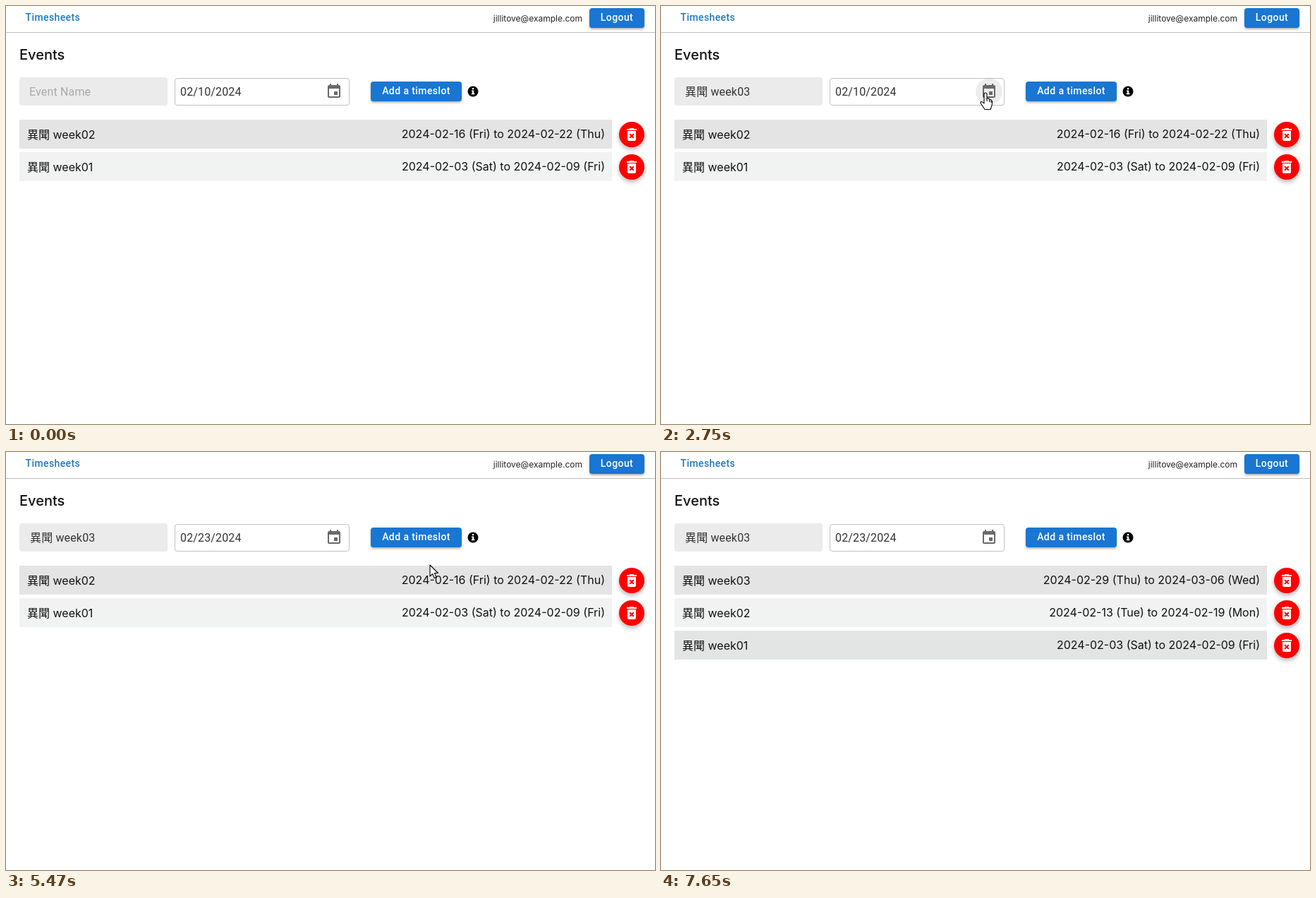
Write an HTML page that moves like this. It is 920x592 px and loops after 9160 ms.

```html
<!DOCTYPE html>
<html lang="en">
<head>
<meta charset="utf-8">
<title>Timesheets</title>
<style>
html, body { margin: 0; width: 100%; height: 100%; overflow: hidden; background: #fff; }
svg { display: block; }
text { font: 16px Inter, "Noto Sans CJK TC", "Noto Sans CJK JP", sans-serif; fill: #111; white-space: pre; }
.cjk { font-weight: 300; }
.rob { font-family: Roboto, "Noto Sans CJK TC", "Noto Sans CJK JP", sans-serif; letter-spacing: .15px; fill: #333; }
.btn { font-size: 14px; font-weight: 500; letter-spacing: .4px; }
.white { fill: #fff; }
.mid { text-anchor: middle; }
.end { text-anchor: end; }
.day { font-size: 12px; letter-spacing: .4px; }
.item { font: 12px "Noto Sans", "Noto Sans CJK TC", "Noto Sans CJK JP", sans-serif; word-spacing: 2px; fill: #222; }
.raised { filter: drop-shadow(0 2px 1.5px rgba(0,0,0,.3)); }
.round { filter: drop-shadow(0 3px 3px rgba(0,0,0,.3)); }
.paper { filter: drop-shadow(0 4px 5px rgba(0,0,0,.32)); }
.menu { filter: drop-shadow(0 1px 2px rgba(0,0,0,.28)); }
</style>
</head>
<body>
<svg width="920" height="592" viewBox="0 0 920 592">
  <g id="page">
    <text class="rob btn" x="27.500" y="21" style="fill:#1f77c2">Timesheets</text>
    <text class="end" x="817" y="22" style="font-size:12px;fill:#222">jillitove@example.com</text>
    <rect class="raised" x="827" y="3" width="78" height="28" rx="4" fill="#1976d2"/>
    <text class="rob btn white mid" x="866" y="21">Logout</text>
    <path d="M0 37.500H920" stroke="#bdbdbd"/>
    <text x="19" y="76" style="font-size:20px;font-weight:500">Events</text>

    <rect x="19" y="101" width="210" height="40" rx="4" fill="#ebebeb"/>
    <text id="name" class="rob" y="127"></text>
    <path id="caret" stroke="#222"/>
    <rect id="box" fill="none"/>
    <text id="date" class="rob" x="247" y="127"></text>
    <circle id="ripple" cx="465" cy="121" r="19" fill="#000" fill-opacity=".07"/>
    <path transform="translate(453 109)" fill="#6b6868" d="M17 12h-5v5h5v-5zM16 1v2H8V1H6v2H5c-1.110 0-1.990.9-1.990 2L3 19c0 1.100.89 2 2 2h14c1.100 0 2-.9 2-2V5c0-1.100-.9-2-2-2h-1V1h-2zm3 18H5V8h14v11z"/>
    <rect id="add" class="raised" x="517" y="107" width="129" height="28" rx="4"/>
    <text class="rob btn white mid" x="581.500" y="125">Add a timeslot</text>
    <circle cx="662" cy="121" r="7.500"/>
    <path d="M661 116h2.200v2.200h-2.200zM660 119.500h3.200v4h1.200v1.700h-4.600v-1.700h1.300v-2.300h-1.100z" fill="#fff"/>
    <g id="rows"></g>
  </g>

  <g id="menu"></g>

  <g id="calendar">
    <rect class="paper" x="239" y="141" width="320" height="334" rx="4" fill="#fff"/>
    <text class="rob" x="263" y="177" style="font-weight:500">February 2024</text>
    <path d="M386 170h10l-5 5z" fill="#666"/>
    <path d="M490 167l-5.500 5 5.500 5M524 167l5.500 5-5.500 5" fill="none" stroke="#666" stroke-width="2"/>
    <circle id="hover" r="18" fill="#f2f7fc"/>
    <circle id="chosen" r="18"/>
    <g id="days"></g>
  </g>

  <g id="loader" fill="#36d7b7"></g>

  <g id="cursor" stroke="#000" stroke-width="1.100" fill="#fff" stroke-linejoin="round">
    <path id="arrow" d="M0 0V16L3.700 12.600L6.200 18.500L9 17.300L6.500 11.500H11.500Z"/>
    <path id="beam" fill="none" d="M-4-8H-1L0-7L1-8H4M0-7V7M-4 8H-1L0 7L1 8H4"/>
    <g id="hand">
      <path d="M-2 2Q-2 0 0 0T2 2V8Q5 7 5.500 9.500Q8 8.500 8 11Q10 10.500 9.500 14L9 18L7 23.500H-1L-6 16Q-8 13-6 12.500Q-4 12.500-2 15Z"/>
      <path d="M2 8V12M5.500 9.500V13M8 11V14" fill="none"/>
    </g>
  </g>
</svg>
<script>
const LOOP = 9160;
const $ = id => document.getElementById(id);
const set = (id, attrs) => { for (const k in attrs) $(id).setAttribute(k, attrs[k]); };
const show = (id, on) => { $(id).style.display = on ? '' : 'none'; };
const clamp = v => Math.max(0, Math.min(1, v));
const smooth = v => v * v * (3 - 2 * v);
const within = (t, a, b) => t >= a && t < b;
// Latest value whose start time has passed
const latest = (t, list) => list.filter(s => s[0] <= t).pop()[1];
const put = (id, html) => {
  const el = $(id);
  if (el.markup !== html) el.innerHTML = el.markup = html;
};
const label = week => `<tspan class="cjk">異聞</tspan> week${week}`;

const TRASH = 'M6 19c0 1.100.9 2 2 2h8c1.100 0 2-.9 2-2V7H6v12zm2.460-7.120l1.410-1.410L12 12.590l2.120-2.120 1.410 1.410L13.410 14l2.120 2.120-1.410 1.410L12 15.410l-2.120 2.120-1.410-1.410L10.590 14l-2.130-2.120zM15.500 4l-1-1h-5l-1 1H5v2h14V4z';
const ROW_FILL = ['#e4e4e4', '#f1f2f2', '#e3e5e4'];
const FIRST = ['01', '2024-02-03 (Sat) to 2024-02-09 (Fri)'];
const BEFORE = [['02', '2024-02-16 (Fri) to 2024-02-22 (Thu)'], FIRST];
const AFTER = [
  ['03', '2024-02-29 (Thu) to 2024-03-06 (Wed)'],
  ['02', '2024-02-13 (Tue) to 2024-02-19 (Mon)'], FIRST];

const rowMarkup = ([week, range], i) => `<g transform="translate(0 ${161 + 46 * i})">
  <rect x="19" width="840" height="41" fill="${ROW_FILL[i]}"/>
  <text x="30" y="27">${label(week)}</text>
  <text class="end" x="849" y="26">${range}</text>
  <circle class="round" cx="887" cy="21" r="18" fill="#f00"/>
  <path transform="translate(875 9)" fill="#fff" d="${TRASH}"/></g>`;

function menuMarkup(weeks, lit) {
  if (!weeks.length) return '';
  return `<rect class="menu" x="103" y="150" width="156" height="${36 * weeks.length + 8}" rx="7" fill="#fff"/>` +
    (lit ? '<rect x="103" y="154" width="156" height="36" fill="#eee"/>' : '') +
    weeks.map((w, i) => `<text class="item" x="115.500" y="${177 + 36 * i}">${label(w)}</text>`).join('');
}

// 1 February 2024 is a Thursday
const dayPos = d => [279 + 40 * ((d + 3) % 7), 254 + 38 * Math.floor((d + 3) / 7)];
function daysMarkup(chosen) {
  let out = [...'SMTWTFS'].map((c, i) =>
    `<text class="rob day mid" x="${279 + 40 * i}" y="218" style="fill:#858585">${c}</text>`).join('');
  for (let d = 1; d < 30; d++) {
    const [x, y] = dayPos(d);
    out += `<text class="rob day mid" x="${x}" y="${y + 4}"${d === chosen ? ' style="fill:#fff;font-weight:700"' : ''}>${d}</text>`;
  }
  return out;
}

// Pointer route: time, x, y
const ROUTE = [
  [170, 885, 585], [480, 285, 346], [700, 156, 122], [850, 156, 122], [1030, 188, 181],
  [1170, 188, 181], [1450, 156, 122], [2250, 156, 122], [2720, 460, 123], [3400, 460, 123],
  [3760, 316, 391], [4050, 358, 391], [4330, 438, 362], [4460, 470, 322], [4620, 479, 367],
  [5180, 479, 367], [5470, 601, 160], [5650, 583, 121], [6200, 583, 121], [6510, 758, 354],
  [6900, 924, 575]];

function pointer(t) {
  const i = ROUTE.findIndex(p => p[0] > t);
  if (i < 1) return null;
  const [t0, x0, y0] = ROUTE[i - 1], [t1, x1, y1] = ROUTE[i];
  const k = smooth((t - t0) / (t1 - t0));
  return [x0 + (x1 - x0) * k, y0 + (y1 - y0) * k];
}

function drawPointer(t) {
  const p = pointer(t);
  show('cursor', p);
  if (!p) return;
  const [x, y] = p;
  const inside = (l, top, r, b) => x >= l && x <= r && y >= top && y <= b;
  const beam = inside(19, 101, 229, 141) || inside(239, 101, 440, 141);
  const hand = inside(446, 101, 484, 141) ||
    (within(t, 3450, 5180) && inside(260, 235, 540, 425)) ||
    (t < 6200 && inside(517, 107, 646, 135));
  show('beam', beam);
  show('hand', hand);
  show('arrow', !beam && !hand);
  set('cursor', { transform: `translate(${x.toFixed(1)} ${y.toFixed(1)})` });
}

function drawForm(t) {
  const week = latest(t, [[0, null], [1170, '02'], [1910, '0'], [2040, '03']]);
  put('name', week ? label(week) : 'Event Name');
  set('name', { x: week ? 34 : 33, style: week ? '' : 'fill:#a9a9a9' });
  show('caret', within(t, 750, 1170) || within(t, 1170, 1690) || within(t, 2040, 2300));
  set('caret', { d: `M${week ? 125.5 : 33.5} 112V131` });

  const weeks = latest(t, [[0, []], [800, ['02', '01', '03', '04', '05']], [1170, []],
    [1910, ['02', '01', '03']], [2040, ['03']], [2300, []]]);
  put('menu', menuMarkup(weeks, within(t, 980, 1170)));

  const picked = t >= 4970, focus = within(t, 2870, 5200);
  $('date').textContent = picked ? '02/23/2024' : '02/10/2024';
  set('box', focus
    ? { x: 240, y: 102, width: 246, height: 38, rx: 3, stroke: '#1c6fc0', 'stroke-width': 2 }
    : { x: 239.5, y: 102.5, width: 247, height: 38, rx: 3.5, stroke: '#c1c1c1', 'stroke-width': 1 });
  show('ripple', within(t, 2660, 3450));
  set('add', { fill: within(t, 5600, 6230) ? '#1565c0' : '#1976d2' });
}

function drawCalendar(t) {
  const alpha = smooth(clamp((t - 2900) / 250)) * (1 - smooth(clamp((t - 5020) / 200)));
  show('calendar', alpha > 0);
  if (!alpha) return;
  const day = t < 4970 ? 10 : 23;
  const [cx, cy] = dayPos(day);
  set('calendar', { opacity: alpha });
  set('chosen', { cx, cy: cy + 1, fill: t < 3450 ? '#2a72c4' : '#1565c0' });
  const over = latest(t, [[0, 0], [3720, 26], [3930, 27], [4130, 28], [4270, 22], [4400, 16], [4560, 23]]);
  show('hover', over);
  if (over) {
    const [hx, hy] = dayPos(over);
    set('hover', { cx: hx, cy: hy + 1 });
  }
  put('days', daysMarkup(day));
}

const LOAD = 6211;
function drawLoader(t) {
  const busy = within(t, LOAD, 7590);
  set('page', { opacity: busy ? 0.2 : 1 });
  show('loader', busy);
  if (!busy) return;
  put('loader', [443, 462, 481].map((x, i) => {
    const age = Math.max(0, t - LOAD - (i === 1 ? 0 : 350));
    const dip = 1 - Math.abs(1 - age % 700 / 350);
    return `<circle cx="${x}" cy="369" r="${7.5 * (1 - 0.25 * dip)}" opacity="${1 - 0.8 * dip}"/>`;
  }).join(''));
}

function frame() {
  const t = performance.now() % LOOP;
  put('rows', (t < 7650 ? BEFORE : AFTER).map(rowMarkup).join(''));
  drawForm(t);
  drawCalendar(t);
  drawLoader(t);
  drawPointer(t);
  requestAnimationFrame(frame);
}
frame();
</script>
</body>
</html>
```
